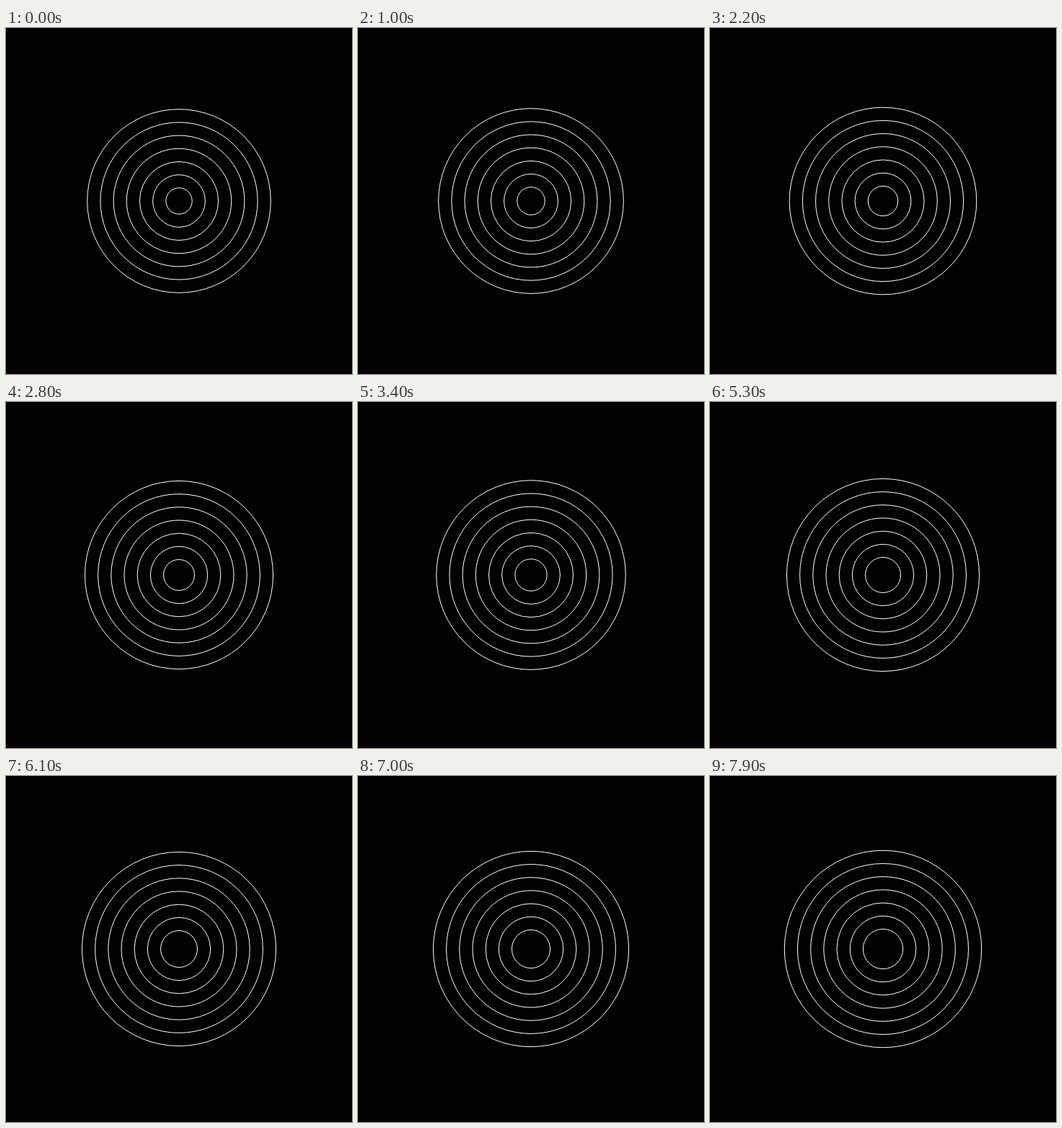
Write an HTML page that moves like this. It is 480x480 px and loops after 8000 ms.

```html
<!DOCTYPE html>
<html lang="en">
<head>
<meta charset="utf-8">
<title>Expanding rings</title>
<style>
  html, body { margin: 0; width: 100%; height: 100%; overflow: hidden; background: #020202; }
  svg { display: block; width: 100%; height: 100%; }
  circle { fill: none; stroke: #fff; stroke-width: 1; }
</style>
</head>
<body>
<svg viewBox="0 0 480 480">
  <rect y="476" width="480" height="4" fill="#080004"/>
  <g id="rings"></g>
</svg>
<script>
  const LOOP = 8000, STEP = 100;
  const RING_COUNT = 7, SPACING = 200 / 11;
  const GROWTH = SPACING / 150; // radius gained per step

  const group = document.getElementById('rings');
  const rings = Array.from({ length: RING_COUNT }, () => {
    const ring = document.createElementNS('http://www.w3.org/2000/svg', 'circle');
    ring.setAttribute('cx', 240);
    ring.setAttribute('cy', 240);
    return group.appendChild(ring);
  });

  function draw(time) {
    // The opening pose is held for two steps.
    const step = Math.max(0, Math.floor((time % LOOP) / STEP) - 1);
    rings.forEach((ring, i) => ring.setAttribute('r', (i + 1) * SPACING + step * GROWTH));
  }

  const start = performance.now();
  function tick() {
    draw(performance.now() - start);
    requestAnimationFrame(tick);
  }
  tick();
</script>
</body>
</html>
```
